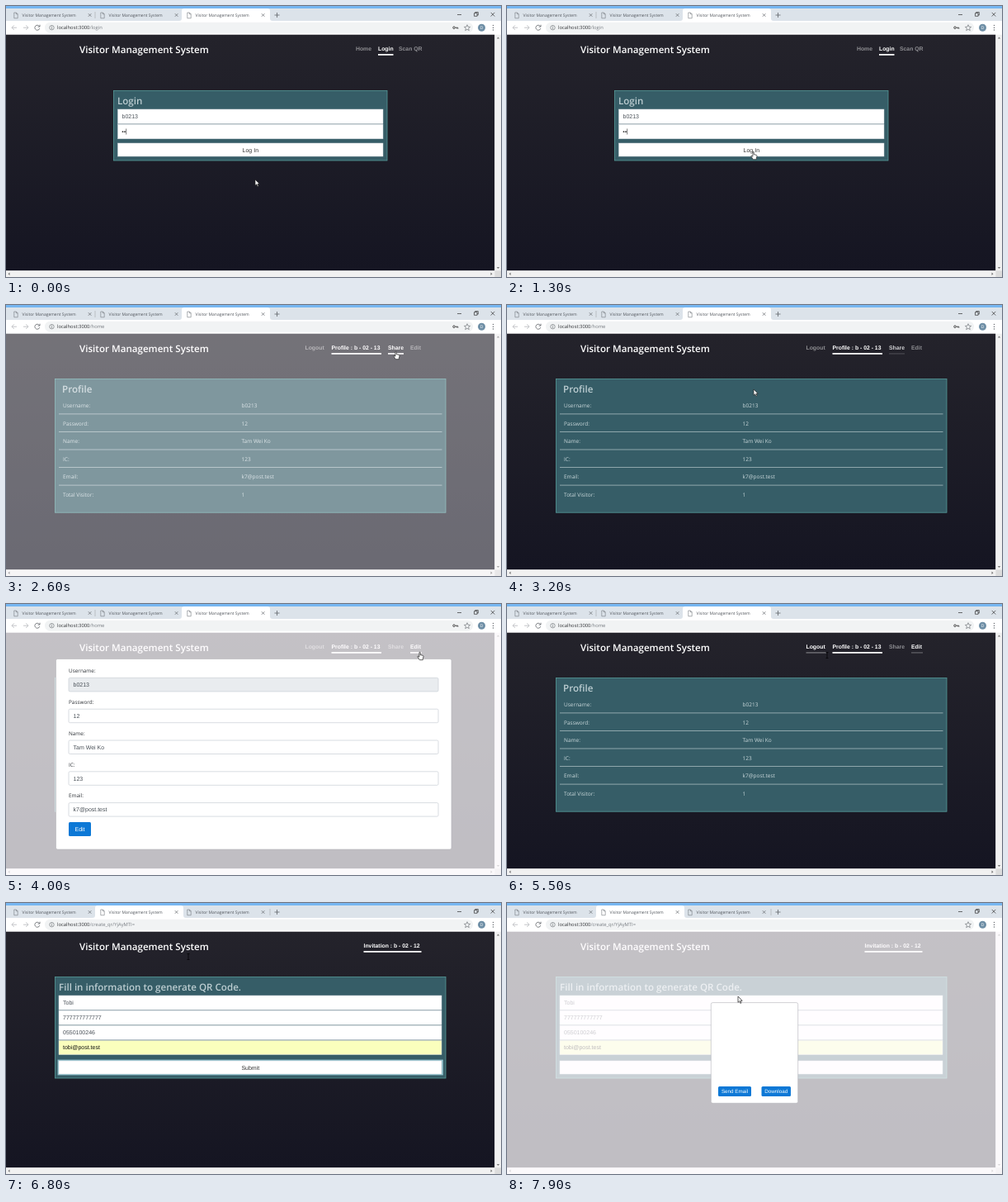
Write an HTML page that moves like this. It is 600 px wide and 328 px high and loops after 8 s.

```html
<!DOCTYPE html>
<html lang="en">
<head>
<meta charset="utf-8">
<title>Visitor Management System</title>
<style>
html, body { margin: 0; width: 100%; height: 100%; overflow: hidden; background: #fff; }
svg { display: block; width: 600px; height: 328px; }
text { white-space: pre; text-rendering: geometricPrecision; }
.ui { font-family: "Open Sans", "Noto Sans", sans-serif; }
.semi { font-weight: 600; }
.form { font-family: "Liberation Sans", Arial, sans-serif; }
.bold { font-weight: 700; }
</style>
</head>
<body>
<svg id="stage" viewBox="0 0 600 328"></svg>
<script>
const LOOP = 8000, STEP = 100;
const stage = document.getElementById('stage');

const user = 'b0213';
const person = { name: 'Tam Wei Ko', id: '123', mail: 'k7@post.test' };
const guest = ['Tobi', '777777777777', '0550100246', 'tobi@post.test'];

// Pointer path: time, x, y, shape on arrival
const path = [
  [0, 302, 210, 'arrow'], [700, 302, 210, 'arrow'], [1100, 298, 176, 'hand'],
  [1500, 298, 176, 'hand'], [1900, 376, 78, 'arrow'], [2200, 376, 78, 'arrow'],
  [2500, 472, 56, 'hand'], [2700, 472, 56, 'hand'], [3000, 299, 102, 'arrow'],
  [3300, 299, 102, 'arrow'], [3800, 501, 58, 'hand'], [4200, 501, 58, 'hand'],
  [4500, 556, 150, 'arrow'], [4900, 556, 150, 'arrow'], [5400, 388, 62, 'beam'],
  [5600, 388, 62, 'beam'], [5700, 377, 55, 'hand'], [5900, 377, 55, 'hand'],
  [6100, 150, 12, 'arrow'], [6300, 150, 12, 'arrow'], [6600, 221, 65, 'beam'],
  [7200, 221, 65, 'beam'], [7600, 294, 236, 'arrow'], [7700, 294, 236, 'arrow'],
  [7900, 280, 113, 'arrow'], [8000, 280, 113, 'arrow']
];

const clamp = v => Math.max(0, Math.min(1, v));
const ramp = (t, a, b) => clamp((t - a) / (b - a));
const ease = v => v * v * (3 - 2 * v);

const rect = (x, y, w, h, fill, extra = '') =>
  `<rect x="${x}" y="${y}" width="${w}" height="${h}" fill="${fill}" ${extra}/>`;
const line = (d, color, width = 1, extra = '') =>
  `<path d="${d}" fill="none" stroke="${color}" stroke-width="${width}" ${extra}/>`;
const shape = (d, fill, extra = '') => `<path d="${d}" fill="${fill}" ${extra}/>`;
const text = (x, y, s, size, fill, cls = 'ui', extra = '') =>
  `<text x="${x}" y="${y}" font-size="${size}" fill="${fill}" class="${cls}" ${extra}>${s}</text>`;
const centered = 'text-anchor="middle"';
const panel = (x, y, w, h) => rect(x, y, w, h, '#365d67', 'stroke="#569b9a" stroke-width=".8"');
const heading = (x, y, s) => text(x, y, s, 11.6, '#bccdd1', 'ui semi');
const field = (x, y, w, h, s, fill = '#fff', color = '#495057') =>
  rect(x, y, w, h, fill, 'stroke="#ced4da" stroke-width=".5"') +
  text(x + 5, y + h / 2 + 2.4, s, 7, color, 'form');

function tab(x, active) {
  const bg = active ? shape(`M${x - 3} 18q3 0 3-3v-9q0-3 3-3h101q3 0 3 3v9q0 3 3 3z`, '#fff') : '';
  return bg +
    line(`M${x + 6.8} 8h2.6l1.8 1.8v5h-4.4zM${x + 9.4} 8v1.8h1.8`, '#73777c', .6) +
    text(x + 16.5, 13.2, 'Visitor Management System', 5, '#50555b') +
    line(`M${x + 96.8} 9.2l3.6 3.6m0-3.6l-3.6 3.6`, '#5f6368', .7);
}

function chrome(active, address, key) {
  const star = 'M559 23l1 2.5 2.6.2-2 1.7.7 2.6-2.3-1.4-2.3 1.4.7-2.6-2-1.7 2.6-.2z';
  let s = rect(0, 0, 600, 18, '#dce3ea') + rect(0, 0, 600, 3, '#76b6f1') + rect(0, 18, 600, 16.7, '#fff');
  [3, 108, 213].forEach((x, i) => { s += tab(x, i === active); });
  s += line(active === 2 ? 'M108 7v8' : 'M320 7v8', '#a4a9ae', .6);
  s += line('M328.5 8v6m-3-3h6', '#5f6368', .8);
  s += line('M547 10.5h5M567.5 8.7h3.6v3.6h-3.6zM568.7 8.7v-1.2h3.6v3.6h-1.2M587.7 7.9l4.6 4.6m0-4.6l-4.6 4.6', '#333', .7);
  s += '<g transform="translate(0 -.3)">';
  s += line('M13 26.5H7m2.8-2.8L7 26.5l2.8 2.8', '#b5b8bb', .8);
  s += line('M21 26.5h6m-2.8-2.8l2.8 2.8-2.8 2.8', '#b5b8bb', .8);
  s += line('M40.5 25a3 3 0 1 0 .3 2.4M41 23v2.4h-2.4', '#5f6368', .8);
  s += rect(47, 20, 519, 13, '#f1f3f4', 'rx="6.5"');
  s += `<circle cx="55.5" cy="26.5" r="2.7" fill="none" stroke="#5f6368" stroke-width=".6"/>`;
  s += line('M55.5 26v2M55.5 24.7v.7', '#5f6368', .7);
  s += text(62, 28.6, `localhost:3000<tspan fill="#777c82">/${address}</tspan>`, 5.85, '#303236');
  if (key) s += `<circle cx="543" cy="26.5" r="1.3" fill="none" stroke="#444" stroke-width=".9"/>` + line('M544.4 26.5h3.4v1.5m-1.5-1.5v1.2', '#444', .9);
  s += line(star, '#5f6368', .6);
  s += `<circle cx="576.5" cy="26.5" r="4.5" fill="#6f8fa6"/>` + text(576.5, 28.4, 'D', 5, '#fff', 'ui', centered);
  [23.7, 26.5, 29.3].forEach(y => { s += `<circle cx="590.5" cy="${y}" r=".7" fill="#5f6368"/>`; });
  return s + '</g>';
}

function pageBase() {
  return rect(0, 34, 592.4, 286.4, 'url(#night)') +
    rect(592.4, 34, 7.6, 287, '#f1f1f1') + rect(0, 320.4, 600, 7.6, '#f1f1f1') + rect(592.4, 320.4, 7.6, 7.6, '#dcdcdc') +
    shape('M594.8 39.5l1.7-2 1.7 2zM594.8 316l1.7 2 1.7-2z', '#777') +
    shape('M4.5 322.5l-2 1.8 2 1.8zM587.5 322.5l2 1.8-2 1.8z', '#777') +
    text(89, 56.6, 'Visitor Management System', 11.6, '#fff', 'ui semi');
}

// glow is the strength of the underline
function link(x, w, s, color, glow) {
  return text(x, 54, s, 6.85, color, 'form bold') +
    (glow ? rect(x, 58, w, 1.8, '#fff', `opacity="${glow}"`) : '');
}

const LIT = '#fff', SOFT = '#cfcfd2', DIM = '#8e8e92';

function profileNav(t) {
  const share = t < 2400 || t >= 3500 ? DIM : t < 3100 ? LIT : SOFT;
  const edit = t >= 3700;
  const out = t >= 5300;
  const shareGlow = share === DIM ? 0 : t < 3100 ? .9 : .12;
  const editGlow = t < 4600 ? .9 : .2;
  return link(362.5, 24.5, 'Logout', out ? LIT : DIM, out ? (t < 5600 ? .28 : 1) : 0) +
    link(394.5, 60.5, 'Profile : b - 02 - 13', LIT, 1) +
    link(463, 19, 'Share', share, shareGlow) +
    link(490, 14, 'Edit', edit ? LIT : DIM, edit ? editGlow : 0);
}

function loginPage(t) {
  const filled = t < 5000;
  let s = link(424, 20, 'Home', DIM, 0) + link(451, 18.5, 'Login', LIT, 1) + link(476, 28, 'Scan QR', DIM, 0);
  s += panel(130.5, 102.5, 331.5, 84.5) + heading(135, 118.8, 'Login');
  s += field(135.5, 125, 321.5, 17.5, filled ? user : '') + field(135.5, 143.2, 321.5, 17.6, '');
  if (filled) {
    s += '<circle cx="141.5" cy="152.2" r=".9" fill="#333"/><circle cx="144" cy="152.2" r=".9" fill="#333"/>';
    if (t % 1000 < 500) s += rect(145.5, 148.5, .6, 7, '#222');
  }
  return s + field(135.5, 166, 321.5, 16, '') + text(296.3, 176.5, 'Log In', 7, '#333', 'form', centered);
}

function profilePage(t) {
  const loaded = t >= 2200;
  const rows = [['Username:', user], ['Password:', '12'], ['Name:', person.name],
    ['IC:', person.id], ['Email:', person.mail], ['Total Visitor:', '1']];
  let s = profileNav(t) + panel(59.5, 89.5, 473.5, 161.7) + heading(68, 105.6, 'Profile');
  rows.forEach(([label, value], i) => {
    const y = 124 + i * 21.55;
    s += text(69, y, label, 6.5, '#cad8db');
    if (loaded || i === 0) s += text(loaded ? 285.5 : 358.5, y, value, 6.5, '#cad8db');
    if (i < 5) s += rect(64, y + 7.5, 464.5, .8, '#a6babd');
  });
  return s;
}

function invitePage(t) {
  const typed = (i, a, b) => guest[i].slice(0, Math.ceil(guest[i].length * ramp(t, a, b)));
  const values = [typed(0, 6200, 6400), typed(1, 6400, 6600), typed(2, 6500, 6700), t >= 6700 ? guest[3] : ''];
  let s = link(433.5, 70, 'Invitation : b - 02 - 12', LIT, 1);
  s += panel(59.5, 89.5, 473.5, 122.5) + heading(64, 105.6, 'Fill in information to generate QR Code.');
  values.forEach((v, i) => {
    const auto = i === 3 && v;
    s += field(64, 112 + i * 18.1, 464, 17.3, v, auto ? '#faffbd' : '#fff', auto ? '#111' : '#495057');
  });
  if (t >= 6700 && t < 7100) s += rect(63.5, 190.5, 465.5, 17, 'none', 'stroke="#8fc0ca" stroke-width="1.8"');
  return s + field(64, 191, 464, 16, '') + text(296.3, 201.5, 'Submit', 7, '#333', 'form', centered);
}

function alertBox() {
  return rect(202, 32, 196.5, 57.5, '#fff', 'rx="2" filter="url(#soft)"') +
    text(208.5, 46.5, 'localhost:3000 says', 6.2, '#2b2d30') +
    text(208.5, 59, 'LOGIN SUCCESS !', 5.45, '#77797d') +
    rect(363, 68, 28.5, 14, '#3b7de9', 'rx="1.5" stroke="#a9c7fa" stroke-width=".7"') +
    text(377.2, 77, 'OK', 5.6, '#fff', 'ui semi', centered);
}

function button(x, y, w, h, s, size) {
  return rect(x, y, w, h, '#0c78d6', 'rx="1.5"') + text(x + w / 2, y + h / 2 + size * .36, s, size, '#fff', 'form', centered);
}

function card(x, y, w, h) {
  return rect(x, y, w, h, '#fff', 'rx="2" stroke="#b4b4b9" stroke-width=".6"');
}

function editCard() {
  const rows = [['Username:', user], ['Password:', '12'], ['Name:', person.name], ['IC:', person.id], ['Email:', person.mail]];
  let s = card(60.5, 66.5, 479.5, 230.5);
  rows.forEach(([label, value], i) => {
    const y = 83.2 + i * 37.8;
    s += text(76, y, label, 6.4, '#2f3338') +
      rect(76, y + 6.2, 448, 16.5, i ? '#fff' : '#e9ecef', 'rx="1.5" stroke="#ced4da" stroke-width=".8"') +
      text(81.5, y + 16.9, value, 7, '#495057', 'form');
  });
  return s + button(76, 264, 27, 17, 'Edit', 7);
}

function codeCard() {
  return card(247.3, 120.6, 105.4, 121.7) + button(256, 222, 40, 12, 'Send Email', 6.3) + button(308.5, 222, 35.5, 12, 'Download', 6.3);
}

function veil(alpha, content) {
  if (!alpha) return '';
  return `<g opacity="${alpha}">` + rect(0, 34, 600, 294, '#fffdff', 'opacity=".73"') + content + '</g>';
}

function pointer(t) {
  let i = 0;
  while (i < path.length - 2 && path[i + 1][0] <= t) i++;
  const [t0, x0, y0, k0] = path[i], [t1, x1, y1, k1] = path[i + 1];
  const p = ramp(t, t0, t1), e = ease(p);
  const kind = p === 0 ? k0 : p === 1 || k0 === k1 ? k1 : 'arrow';
  const art = {
    arrow: 'M0 0v7.3l1.7-1.5 1.2 2.6 1.2-.6-1.2-2.5h2.3z',
    hand: 'M0 .4q.9-.7 1.2.4v2.8l3 .7q1 .4.8 1.5l-.7 2.6v1.3H.3l-2.4-3.7q-.2-1.2 1-.7l1 .9z'
  };
  const place = `transform="translate(${x0 + (x1 - x0) * e} ${y0 + (y1 - y0) * e})"`;
  if (kind === 'beam') return line('M-1.5-3.5h3M0-3.5v7M-1.5 3.5h3', '#050507', .8, place);
  return shape(art[kind], '#fff', place + ' stroke="#222" stroke-width=".7"');
}

const defs = `<defs>
  <linearGradient id="night" x1="0" y1="0" x2="0" y2="1"><stop offset="0" stop-color="#24232b"/><stop offset="1" stop-color="#151522"/></linearGradient>
  <filter id="soft" x="-10%" y="-10%" width="120%" height="130%"><feDropShadow dx="0" dy="1" stdDeviation="1.5" flood-opacity=".4"/></filter>
</defs>`;

function draw(t) {
  const invite = t >= 6200;
  const profile = t >= 1600 && t < 5700;
  const address = invite ? 'create_qr/YjAyMTI=' : profile ? 'home' : 'login';
  const fade = (a, b) => Math.min(ramp(t, a, a + 200), 1 - ramp(t, b, b + 200));
  let s = defs + pageBase();
  s += invite ? invitePage(t) : profile ? profilePage(t) : loginPage(t);
  s += veil(fade(2500, 3000), '') + veil(fade(3700, 4500), editCard()) + veil(ramp(t, 7100, 7300), codeCard());
  s += chrome(invite ? 1 : 2, address, !invite);
  if (t >= 1600 && t < 2200) s += alertBox();
  stage.innerHTML = s + pointer(t);
}

let shown = -1;
function frame() {
  const t = Math.floor(performance.now() % LOOP / STEP) * STEP;
  if (t !== shown) draw(shown = t);
  requestAnimationFrame(frame);
}
frame();
</script>
</body>
</html>
```
